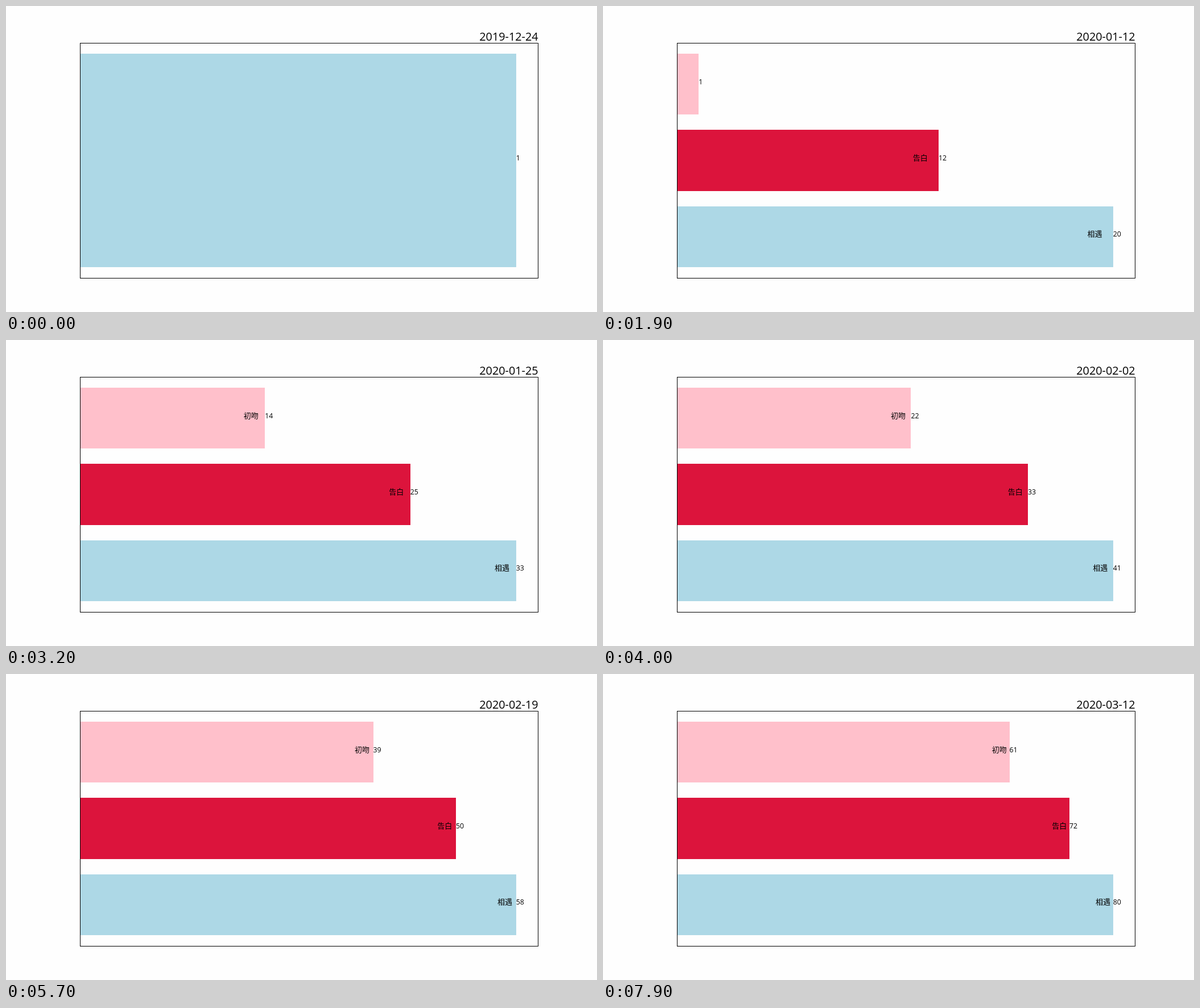
An HTML page with a canvas that plays this animation: 1039 px wide and 539 px high, repeating every 8000 ms.

```html
<!DOCTYPE html>
<html lang="zh-CN">
<head>
<meta charset="utf-8">
<style>
  html, body { margin: 0; width: 100%; height: 100%; overflow: hidden; background: #fefefe; }
  canvas { display: block; }
</style>
</head>
<body>
<canvas id="chart" width="1039" height="539"></canvas>
<script>
const ctx = document.getElementById('chart').getContext('2d');
const DAY_MS = 100, DAYS = 80;
const plot = { x: 130, y: 65, w: 805, h: 414 };
const PAD = 1.05;          // room right of the longest bar
const BAR = 0.8;           // bar height as a share of its row
const startDate = Date.UTC(2019, 11, 24);
const latinFont = '"Open Sans", "Noto Sans", sans-serif';
const labelFont = '13px "Noto Sans CJK SC", "Noto Sans CJK", sans-serif';

// Newest event on top; each counts the days since it began.
const events = [
  { name: '初吻', color: '#ffc0cb', start: 18 },
  { name: '告白', color: '#dc143c', start: 7 },
  { name: '相遇', color: '#add8e6', start: -1 },
];

function text(value, x, y, font, align) {
  ctx.font = font;
  ctx.textAlign = align;
  ctx.fillStyle = '#000';
  ctx.fillText(value, x, y);
}

function draw(day) {
  ctx.fillStyle = '#fefefe';
  ctx.fillRect(0, 0, 1039, 539);

  const rows = events.filter(event => day > event.start);
  const unit = plot.w / PAD / (day + 1);
  const barsHeight = plot.h / 1.1;
  const top = plot.y + (plot.h - barsHeight) / 2;
  const pitch = barsHeight / (rows.length - 1 + BAR);

  rows.forEach(({ name, color, start }, i) => {
    const count = day - start;
    const end = plot.x + count * unit;
    const y = top + i * pitch;
    const y0 = Math.round(y), y1 = Math.round(y + pitch * BAR);
    const baseline = Math.round(y + pitch * BAR / 2);
    ctx.fillStyle = color;
    ctx.fillRect(plot.x, y0, Math.round(end) - plot.x, y1 - y0);
    if (count > 1) text(name, end - unit / 2, baseline, labelFont, 'right');
    text(count, end, baseline, '12.3px ' + latinFont, 'left');
  });

  ctx.strokeStyle = '#000';
  ctx.lineWidth = 1;
  ctx.strokeRect(plot.x + 0.5, plot.y + 0.5, plot.w, plot.h);

  const date = new Date(startDate + day * 864e5).toISOString().slice(0, 10);
  text(date, plot.x + plot.w + 0.5, 61, '19.8px ' + latinFont, 'right');
}

const begin = performance.now();
function tick() {
  draw(Math.floor((performance.now() - begin) / DAY_MS) % DAYS);
  requestAnimationFrame(tick);
}
tick();
</script>
</body>
</html>
```
